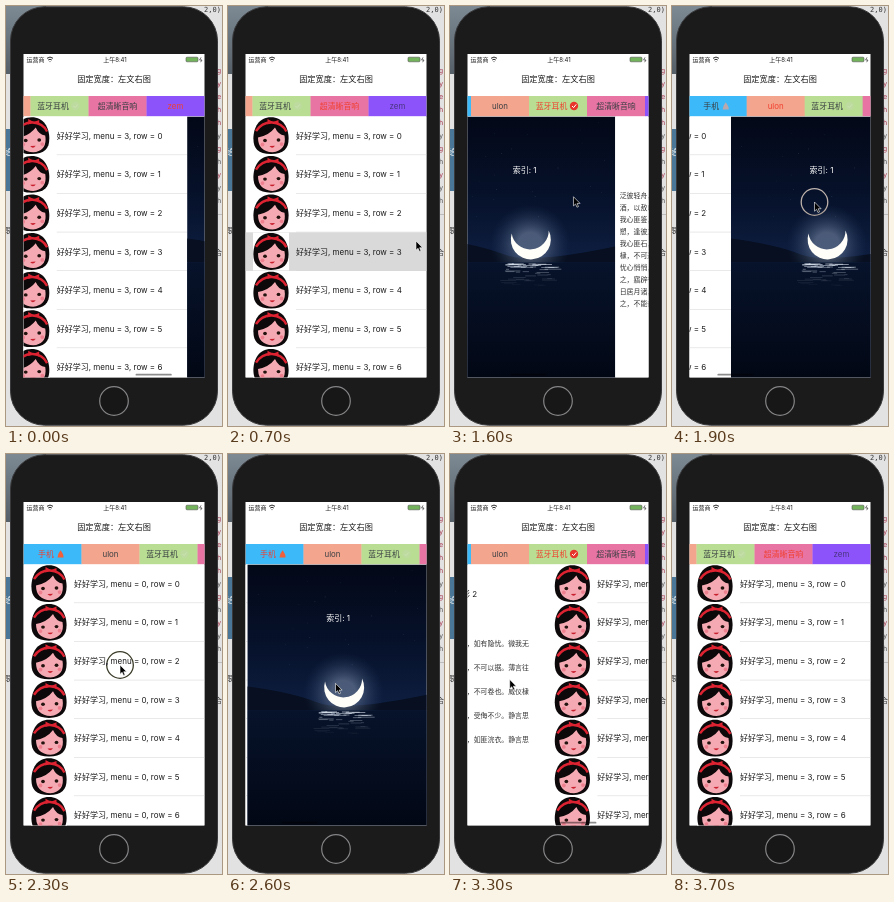
These frames come from a looping animation (216x420 px, 3800 ms). An HTML page:

```html
<!DOCTYPE html>
<html lang="zh-CN">
<head>
<meta charset="utf-8">
<title>Paged menu</title>
<style>
html, body { margin: 0; width: 100%; height: 100%; overflow: hidden; background: #e2e2e2; }
svg { display: block; width: 100vw; height: 100vh; }
text { font-family: Inter, "Noto Sans CJK SC", "Noto Sans CJK", sans-serif; fill: #1c1c1c; white-space: pre; }
.code { font-family: "DejaVu Sans Mono", "Noto Sans CJK SC", monospace; fill: #333; }
#ring { mix-blend-mode: difference; }
</style>
</head>
<body>
<svg id="stage" viewBox="0 0 216 420"></svg>
<script>
const LOOP = 3800, LEFT = 17.5, W = 181, H = 261, TOP = 110.5;
const TAB = 58, TAB_H = 20.5, ROW = 38.6, SEA = 146;
const SWIPE = 280, DRAG = SWIPE / 2, SLIDE = 240, FIRST = 4;

const tabs = [
  { name: '手机', color: '#3bb9f8', icon: 'flame' },
  { name: 'ulon', color: '#f4a58d' },
  { name: '蓝牙耳机', color: '#b8dd93', icon: 'check' },
  { name: '超清晰音响', color: '#e874a4' },
  { name: 'zem', color: '#8c53fb' }
];
const poem = [
  '泛彼轻舟，亦泛其流。耿耿不寐，如有隐忧。微我无', '酒，以敖以游。',
  '我心匪鉴，不可以茹。亦有兄弟，不可以据。薄言往', '愬，逢彼之怒。',
  '我心匪石，不可转也。我心匪席，不可卷也。威仪棣', '棣，不可选也。',
  '忧心悄悄，愠于群小。觏闵既多，受侮不少。静言思', '之，寤辟有摽。',
  '日居月诸，胡迭而微？心之忧矣，如匪浣衣。静言思', '之，不能奋飞。'
];

// Each swipe: press time and point, the page it leads to, a resting point after it
const swipes = [
  { at: -223, to: 3, x: 135, y: 205, rest: [700, 188, 235] },
  { at: 800, to: 2, x: 60, y: 200 },
  { at: 1400, to: 1, x: 36, y: 190 },
  { at: 1812, to: 0, x: 101, y: 196, rest: [2300, 114, 211] },
  { at: 2340, to: 1, x: 130, y: 215 },
  { at: 2643, to: 2, x: 120, y: 232, rest: [2900, 8, 242] },
  { at: 3150, to: 3, x: 150, y: 225, rest: [3650, 145, 422] }
];
swipes.forEach((s, i) => s.from = i ? swipes[i - 1].to : FIRST);

const clamp = (v, lo = 0, hi = 1) => Math.min(hi, Math.max(lo, v));
const ease = u => (1 - Math.cos(Math.PI * clamp(u))) / 2;
const mix = (a, b, u) => a + (b - a) * u;
const tabShift = i => clamp((i + 0.5) * TAB - W / 2, 0, tabs.length * TAB - W);

function random(seed) {
  return () => (seed = seed * 16807 % 2147483647) / 2147483647;
}

// Markup helpers; text is placed by its vertical middle
const text = (x, y, size, str, more = '') =>
  `<text x="${x}" y="${y + size * 0.37}" font-size="${size}" ${more}>${str}</text>`;
const rect = (x, y, w, h, fill, more = '') =>
  `<rect x="${x}" y="${y}" width="${w}" height="${h}" fill="${fill}" ${more}/>`;
const mid = 'text-anchor="middle"';

function listPage(n) {
  let out = rect(0, 0, W, H, '#fff');
  for (let r = 0; r < 7; r++) {
    const y = r * ROW;
    if (n === 3 && r === 3) out += rect(0, y, W, ROW, '#d9d9d9', 'id="picked"');
    out += rect(50.5, y + ROW - 0.5, W - 50.5, 0.5, '#d2d2d5');
    out += `<use href="#girl" x="7.5" y="${y}"/>`;
    out += text(50.5, y + 19.4, 8, `好好学习, menu = ${n}, row = ${r}`);
  }
  return out;
}

function moonPage(n) {
  const rnd = random(7);
  let out = rect(0, 0, W, H, 'url(#sky)');
  for (let i = 0; i < 26; i++)
    out += `<circle cx="${rnd() * W}" cy="${rnd() * 110}" r=".35" fill="#8fa8cc" opacity="${rnd() * 0.5}"/>`;
  out += `<path d="M0 ${SEA}V122Q45 128 70 138T${W} 130V${SEA}Z" fill="#070f20"/>`;
  out += '<circle cx="96" cy="128" r="40" fill="url(#glow)"/>';
  out += rect(0, SEA, W, H - SEA, 'url(#sea)');
  for (let i = 0; i < 60; i++) {
    const d = rnd() ** 1.6, w = 3 + rnd() * 14, x = 96 + (rnd() - 0.5) * 46 - w / 2;
    out += rect(x, SEA + 1 + d * 34, w, 0.8, '#dfe8f5', `opacity="${0.75 * (1 - d) ** 3}"`);
  }
  out += '<path d="M77.5 117A20 20 0 1 0 114.5 114A18.6 18.6 0 0 1 77.5 117Z" fill="#fffef8"/>';
  return out + text(W / 2, 53.5, 8, `索引: ${n}`, `${mid} style="fill:#fff"`);
}

function poemPage(n) {
  return rect(0, 0, W, H, '#fff') +
    text(W / 2, 29.5, 8, `汀歌·芦影 ${n}`, mid) +
    poem.map((line, i) => text(4.5, 79 + i * 12, 6.9, line, 'style="fill:#333"')).join('');
}

function tab({ name, color, icon }, i) {
  const c = (i + 0.5) * TAB, textX = icon ? c - 6.5 : c;
  const ix = textX + name.length * 4 + 6.5;
  let out = rect(i * TAB, 0, TAB + 0.3, TAB_H, color) + text(textX, 10, 7.9, name, `${mid} class="name"`);
  if (icon === 'flame')
    out += `<path id="flame" d="M${ix} 6.3Q${ix + 3.4} 10.5 ${ix + 3} 13.4H${ix - 3}Q${ix - 3} 10.5 ${ix} 6.3Z"/>`;
  if (icon === 'check')
    out += `<circle id="disc" cx="${ix}" cy="10" r="4.2"/>` +
      `<path id="tick" d="M${ix - 2} 10l1.6 1.6 2.6-3.2" fill="none"/>`;
  return out;
}

function desktop() {
  const rnd = random(11);
  let out = rect(0, 0, 216, 420, '#e2e2e2') + rect(0, 0, 40, 68, 'url(#slate)') + rect(0, 123, 12, 62, '#4a7797');
  for (let y = 64; y < 205; y += 13)
    out += text(211, y, 7, 'gyhae'[Math.floor(rnd() * 5)], `class="code" style="fill:${rnd() < 0.5 ? '#a5384c' : '#555'}"`);
  return out + rect(206, 208, 10, 0.8, '#b5b5b5') +
    text(198, 3, 7, '2,0)', 'class="code"') + text(-2, 146, 8, '给', 'style="fill:#fff"') +
    text(-2, 224, 7, '跟', 'class="code"') + text(209, 246, 7, '合', 'class="code"');
}

const makers = [listPage, moonPage, poemPage];
const stage = document.getElementById('stage');
stage.innerHTML = `
<defs>
  <clipPath id="screen">${rect(LEFT, TOP, W, H)}</clipPath>
  <clipPath id="bar">${rect(LEFT, 90, W, TAB_H)}</clipPath>
  <linearGradient id="slate" x2="0" y2="1"><stop stop-color="#7d8a93"/><stop offset="1" stop-color="#555f68"/></linearGradient>
  <linearGradient id="sky" x2="0" y2="1">
    <stop stop-color="#030817"/><stop offset=".3" stop-color="#06112a"/><stop offset=".54" stop-color="#0e1e40"/>
  </linearGradient>
  <linearGradient id="sea" x2="0" y2="1"><stop stop-color="#07132b"/><stop offset="1" stop-color="#020714"/></linearGradient>
  <radialGradient id="glow">
    <stop offset=".3" stop-color="#a9bcd8" stop-opacity=".4"/><stop offset="1" stop-color="#3a5580" stop-opacity="0"/>
  </radialGradient>
  <g id="girl">
    ${rect(0, 0.3, 36, 37.8, '#fff')}
    <path d="M18 .8C30 .8 35.6 11 35.6 22C35.6 32 31 37.6 18 37.6C5 37.6 .4 32 .4 22C.4 11 6 .8 18 .8Z" fill="#0d0809"/>
    <path d="M5 21Q16 19 22 11Q25 18 31.5 19Q34 34 19.5 35.8Q5 35 5 21Z" fill="#f5aab3"/>
    <path d="M3 14.5Q9 5.6 19 6Q29 6.4 33.4 15" fill="none" stroke="#dd2231" stroke-width="2.5"/>
    <path d="M20 5.6L14.5 2.6V8ZM20 5.6L25.5 3.4V8.6Z" fill="#dd2231"/>
    <g fill="#23130f"><ellipse cx="12" cy="24" rx="1.9" ry="1.7"/><ellipse cx="25.5" cy="23.5" rx="1.9" ry="1.7"/></g>
    <g fill="#ee7f8f"><circle cx="9.5" cy="28" r="1.9"/><circle cx="28.6" cy="27.6" r="1.9"/></g>
    <path d="M16.5 29.6Q19.3 33 22 29.3Z" fill="#c8202e"/>
  </g>
</defs>
${desktop()}
<rect x="4.5" y=".8" width="207" height="418.4" rx="34" fill="#1b1b1c" stroke="#39393b"/>
<circle cx="108" cy="395" r="14.3" fill="#171717" stroke="#858587" stroke-width="1.2"/>
${rect(LEFT, 48, W, TOP + H - 48, '#fff')}
${text(20.5, 53.5, 6, '运营商')}
<path d="M41 52.3Q44 49.8 47 52.3M42.2 54Q44 52.5 45.8 54M43.6 55.6H44.4" fill="none" stroke="#111" stroke-width=".9"/>
${text(109, 53.5, 6, '上午8:41', mid)}
${rect(180, 51.2, 12, 4.6, '#72b35c', 'rx="1" stroke="#555" stroke-width=".6"')}
<path d="M195 51.4L193.6 54H196L194.6 56.2" fill="none" stroke="#333" stroke-width=".7"/>
${text(108, 73, 8.2, '固定宽度：左文右图', mid)}
<g clip-path="url(#bar)"><g id="menu">${tabs.map(tab).join('')}</g></g>
<g clip-path="url(#screen)">
  ${tabs.map((_, i) => `<g class="page">${makers[i % 3](i)}</g>`).join('')}
  ${rect(0, 367.8, W / 5, 1.7, '#000', 'id="thumb" rx=".85" fill-opacity=".45"')}
</g>
<circle id="ring" r="13.3" fill="none" stroke="#c4c4d6" stroke-width="1.3"/>
<path id="arrow" d="M0 0V9.2L2.1 7.3 3.5 10.5 5 9.9 3.7 6.7H6.6Z" fill="#000" stroke="#fff" stroke-width=".6"/>`;

const pages = stage.querySelectorAll('.page'), names = stage.querySelectorAll('.name');
const [menu, thumb, ring, arrow, picked, flame, disc, tick] =
  ['menu', 'thumb', 'ring', 'arrow', 'picked', 'flame', 'disc', 'tick'].map(id => document.getElementById(id));

const progress = (s, t) => ease((t - s.at) / SWIPE);
const dragX = (s, t) => s.x + (s.from - s.to) * W * progress(s, t);

// Where the pointer is known to be: press, release and rest
const stops = swipes.flatMap(s => [
  [s.at, s.x, s.y], [s.at + DRAG, dragX(s, s.at + DRAG), s.y], ...(s.rest ? [s.rest] : [])
]);

function pointer(t) {
  const held = swipes.find(s => t >= s.at && t < s.at + DRAG);
  if (held) return [dragX(held, t), held.y];
  const i = stops.findIndex(s => s[0] > t);
  if (i < 0) return stops[stops.length - 1].slice(1);
  const a = stops[i - 1], b = stops[i], u = ease((t - a[0]) / (b[0] - a[0]));
  return [mix(a[1], b[1], u), mix(a[2], b[2], u)];
}

function draw(t) {
  let p = FIRST, shift = tabShift(FIRST), sel = FIRST;
  for (const s of swipes) {
    p += (s.to - s.from) * progress(s, t);
    shift += (tabShift(s.to) - tabShift(s.from)) * ease((t - s.at - SWIPE) / SLIDE);
    if (t >= s.at + SWIPE) sel = s.to;
  }
  pages.forEach((g, i) => {
    g.setAttribute('transform', `translate(${LEFT + W * (i - p)} ${TOP})`);
    g.style.display = Math.abs(i - p) < 1 ? '' : 'none';
  });
  thumb.setAttribute('x', LEFT + p * W / 5);
  thumb.style.opacity = Math.abs(p - Math.round(p)) > 0.002 ? 1 : 0;
  picked.style.opacity = t >= 500 && t < 1080 ? 1 : 0;

  menu.setAttribute('transform', `translate(${LEFT - shift} 90)`);
  names.forEach((el, i) => el.style.fill = i === sel ? '#f04030' : i === 4 ? '#4b3580' : '#3a3f42');
  flame.setAttribute('fill', sel === 0 ? '#f0603a' : '#b9a9ae');
  disc.setAttribute('fill', sel === 2 ? '#e8352b' : '#bddb9e');
  tick.setAttribute('stroke', sel === 2 ? '#fff' : '#cbe2b4');

  const place = `translate(${pointer(t).join(' ')})`;
  arrow.setAttribute('transform', place);
  ring.setAttribute('transform', place);
  ring.style.opacity = swipes.some(s => t >= s.at - 40 && t < s.at + DRAG) ? 1 : 0;
}

const begin = performance.now();
function frame() {
  draw((performance.now() - begin) % LOOP);
  requestAnimationFrame(frame);
}
frame();
</script>
</body>
</html>
```
